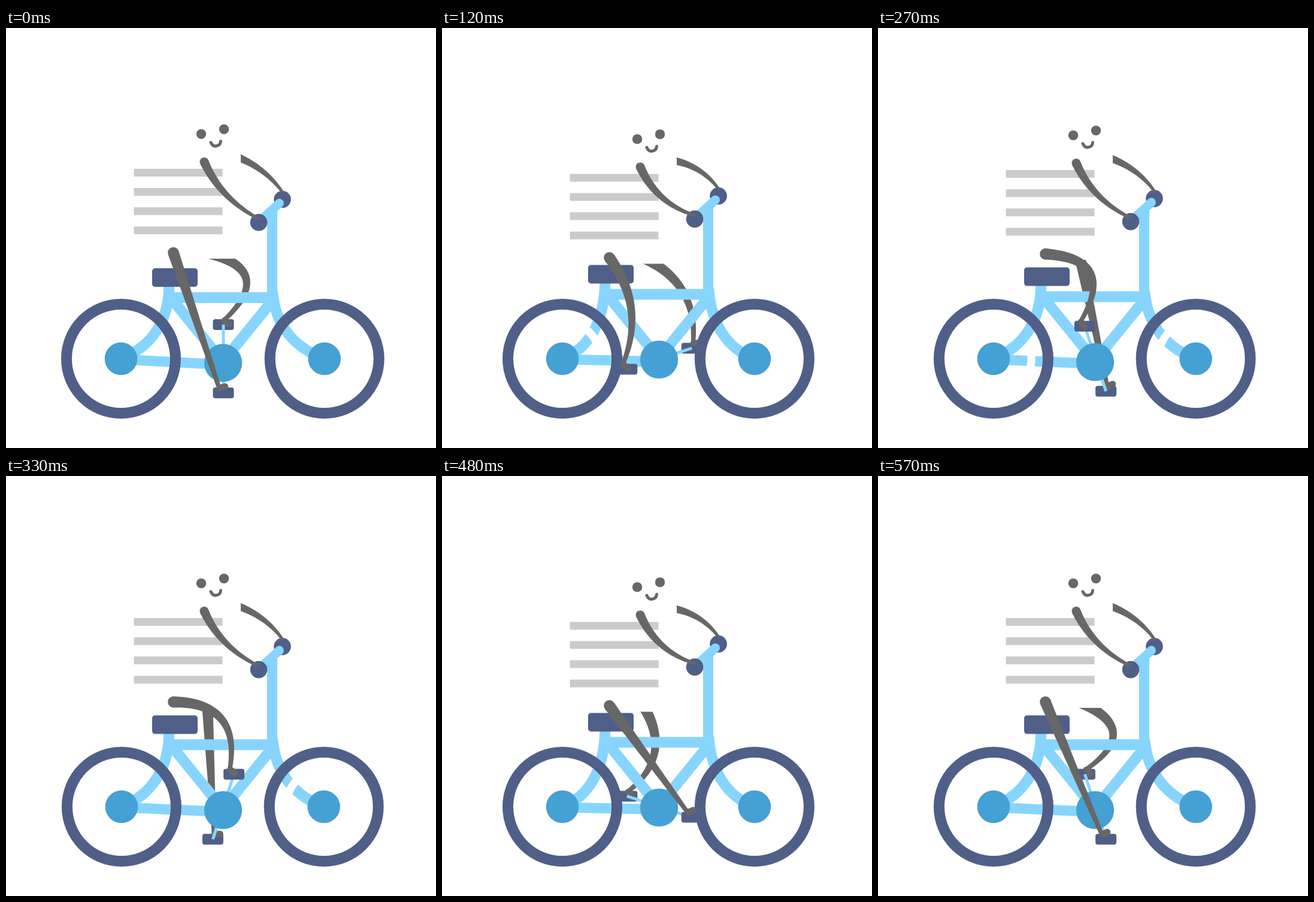
An HTML page with a canvas for the animation above (600 ms loop, 718x701 px).

```html
<!DOCTYPE html>
<html lang="en">
<head>
<meta charset="utf-8">
<title>Bicycle ride</title>
<style>
html, body { margin: 0; width: 100%; height: 100%; overflow: hidden; background: #fff; }
canvas { display: block; }
</style>
</head>
<body>
<canvas id="stage" width="718" height="701"></canvas>
<script>
const ctx = document.getElementById('stage').getContext('2d');
const NAVY = '#4f5f87', SKY = '#87d5ff', BLUE = '#45a0d3', GREY = '#676767', LINE = '#cbcbcb';
const LOOP = 600, STEP = 30, RAD = Math.PI / 180;

function disc(x, y, r, color) {
  ctx.fillStyle = color;
  ctx.beginPath();
  ctx.arc(x, y, r, 0, 7);
  ctx.fill();
}

function box(x, y, w, h, color, r = 0) {
  ctx.fillStyle = color;
  ctx.beginPath();
  ctx.roundRect(x, y, w, h, r);
  ctx.fill();
}

function stroke(path, width, color, cap = 'butt') {
  ctx.strokeStyle = color;
  ctx.lineWidth = width;
  ctx.lineCap = cap;
  ctx.lineJoin = 'round';
  ctx.stroke(new Path2D(path));
}

// Quadratic curve from a to b whose radius shrinks from r0 to r1.
function limb(a, c, b, r0, r1) {
  const left = [], right = [], n = 32;
  for (let i = 0; i <= n; i++) {
    const t = i / n, u = 1 - t, r = r0 + (r1 - r0) * t;
    const x = u * u * a[0] + 2 * u * t * c[0] + t * t * b[0];
    const y = u * u * a[1] + 2 * u * t * c[1] + t * t * b[1];
    const dx = u * (c[0] - a[0]) + t * (b[0] - c[0]);
    const dy = u * (c[1] - a[1]) + t * (b[1] - c[1]);
    const k = r / Math.hypot(dx, dy);
    left.push([x - dy * k, y + dx * k]);
    right.unshift([x + dy * k, y - dx * k]);
  }
  ctx.fillStyle = GREY;
  ctx.beginPath();
  left.concat(right).forEach(p => ctx.lineTo(...p));
  ctx.fill();
  disc(...a, r0, GREY);
  disc(...b, r1, GREY);
}

const pedalAt = deg => [363 + 57 * Math.sin(deg * RAD), 552 - 57 * Math.cos(deg * RAD)];

function pedal(deg) {
  const [x, y] = pedalAt(deg);
  box(x - 17.5, y - 9, 35, 18, NAVY, 4);
}

// The knee bends most when the crank is at the peak angle, and is straight far from it.
function leg(hip, deg, shift, peak) {
  const [px, py] = pedalAt(deg);
  const ankle = [px + shift, py - 8];
  const dx = ankle[0] - hip[0], dy = ankle[1] - hip[1], d = Math.hypot(dx, dy);
  const away = Math.abs((deg - peak + 540) % 360 - 180);
  const bend = 104 * Math.max(0, Math.cos(away * 0.75 * RAD));
  const knee = [hip[0] + dx / 2 + dy / d * bend, hip[1] + dy / 2 - dx / d * bend];
  limb(hip, knee, ankle, 9.3, 3.6);
  const tilt = (15 + 42 * Math.cos((deg - 315) * RAD)) * RAD;
  const [c, s] = [Math.cos(tilt), Math.sin(tilt)];
  stroke(`M${ankle[0] + c} ${ankle[1] + s}l${c * 9} ${s * 9}`, 11, GREY, 'round');
}

// The white quarter arc wipes across the tubes as the wheel turns.
function wheel(x, deg) {
  ctx.lineCap = 'round';
  ctx.strokeStyle = '#fff';
  ctx.lineWidth = 13;
  ctx.beginPath();
  ctx.arc(x, 552, 63, deg * RAD, (deg + 90) * RAD);
  ctx.stroke();
  ctx.strokeStyle = NAVY;
  ctx.lineWidth = 18;
  ctx.beginPath();
  ctx.arc(x, 552, 91, 0, 7);
  ctx.stroke();
  disc(x, 552, 27.3, BLUE);
}

function draw(time) {
  const t = Math.floor(time % LOOP / STEP) * STEP;
  const turn = t / LOOP * 360;
  const bob = 1 - Math.abs(1 - t % 300 / 150);
  const sink = 10.5 * bob, lift = -7 * bob;
  const slide = 5 * (1 - Math.cos(2 * turn * RAD));
  const back = 192 + slide, front = 531.7 - slide * 1.09;
  const far = turn, near = turn + 180;
  const Y = y => y + lift;

  ctx.fillStyle = '#fff';
  ctx.fillRect(0, 0, 718, 701);

  // Far side
  pedal(far);
  leg([336, 375 + sink], far, 2, 357);
  disc(461.5, Y(286), 14.3, NAVY);
  limb([375, 211 + sink], [430, 230 - 5 * bob], [461, Y(273)], 7, 2.3);
  box(180, 120, 212, 265 + sink, '#fff');

  // Frame
  const [ax, ay] = pedalAt(far), [bx, by] = pedalAt(near);
  stroke(`M${ax} ${ay}L${bx} ${by}`, 5, SKY);
  stroke(`M${back} 553L362 ${Y(562)}`, 17, SKY);
  stroke(`M272 ${Y(425)}V${Y(440)}C268 ${Y(500)} ${235 + slide} 535 ${back} 552`, 18, SKY);
  stroke(`M445 ${Y(440)}C450 ${Y(500)} ${485 - slide} 535 ${front} 552`, 18, SKY);
  stroke(`M272 ${Y(450)}H445`, 18, SKY);
  stroke(`M275 ${Y(450)}L362 ${Y(557)}L449 ${Y(450)}`, 18, SKY);
  stroke(`M444.5 ${Y(302)}V${Y(450)}`, 17, SKY);
  stroke(`M422 ${Y(324)}L456.5 ${Y(292.5)}`, 15, SKY, 'round');
  disc(422, Y(324.5), 14.3, NAVY);
  box(244, Y(401), 76, 31, NAVY, 5);
  pedal(near);
  wheel(back, 180 + turn);
  wheel(front, turn);
  disc(362.5, Y(559), 31.7, BLUE);

  // Near side
  for (let i = 0; i < 4; i++) box(213.5, 235 + i * 32.1 + sink, 148, 13, LINE);
  disc(326, 177 + sink, 8.2, GREY);
  disc(364, 169 + sink, 8.2, GREY);
  stroke(`M342 ${191 + sink}q3 7 9 6q7 -1 7.5 -8`, 5, GREY, 'round');
  limb([331, 223.5 + sink], [358, 284 + sink], [421, Y(318)], 7.5, 2.5);
  leg([279.5, 375 + sink], near, -7, 333);
}

const start = performance.now();
function tick() {
  draw(performance.now() - start);
  requestAnimationFrame(tick);
}
tick();
</script>
</body>
</html>
```
